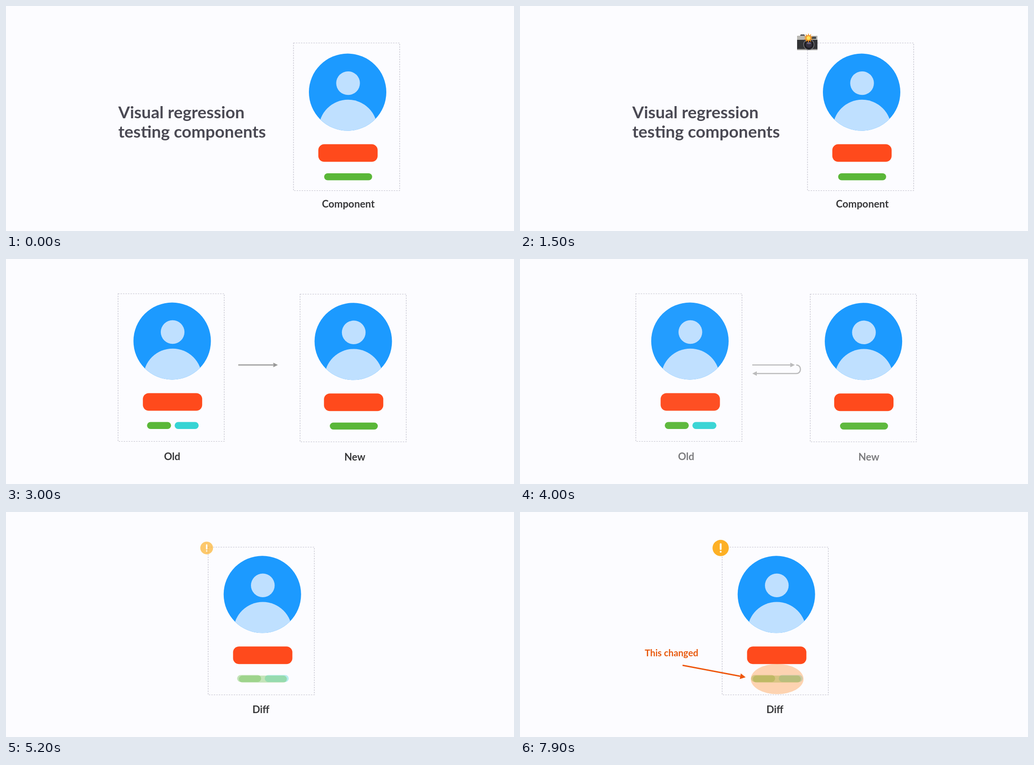
These frames come from a looping animation (1122x499 px, 8 s). An HTML page:

```html
<!DOCTYPE html>
<html lang="en">
<head>
<meta charset="utf-8">
<title>Visual regression testing</title>
<style>
  html, body { margin: 0; width: 100%; height: 100%; overflow: hidden; background: #fcfcff; }
  svg { display: block; width: 1122px; height: 499px; }
  text { font: 700 22.3px Lato, sans-serif; fill: #38383a; }
  .label { text-anchor: middle; }
  #title text { font-size: 37px; fill: #4b4a54; }
  .box { fill: none; stroke: #bdbcc8; stroke-width: 1.2; stroke-dasharray: 3 2.5; }
  .line { fill: none; stroke: #999; stroke-width: 2.6; }
  .head { fill: #999; }
  #note { font-size: 20.3px; fill: #e8590c; }
  #pointer .line { stroke: #ee560c; stroke-width: 3; }
  #pointer .head { fill: #ee560c; }
</style>
</head>
<body>
<svg viewBox="0 0 1122 499">
  <defs>
    <clipPath id="round"><circle r="85.5"/></clipPath>
    <g id="profile">
      <circle r="85.5" fill="#1c9aff"/>
      <g fill="#bfe0ff">
        <circle cx="1" cy="-20" r="26.2"/>
        <circle cx="1" cy="81.3" r="64.6" clip-path="url(#round)"/>
      </g>
      <rect x="-64.7" y="115.5" width="131" height="39" rx="13" fill="#ff4a1c"/>
    </g>
  </defs>

  <g id="title">
    <text x="248" y="249">Visual regression</text>
    <text x="248" y="291.5">testing components</text>
  </g>
  <text id="component" class="label" x="756" y="447">Component</text>

  <g id="oldCard">
    <g id="oldBody">
      <rect class="box" x="-119.5" y="-105" width="234.5" height="327.5"/>
      <use href="#profile"/>
    </g>
    <g id="oldBars">
      <rect x="-55.5" y="179.5" width="53" height="15.6" rx="7.8" fill="#5ab738"/>
      <rect x="5.5" y="179.5" width="53" height="15.6" rx="7.8" fill="#36d4d4"/>
    </g>
  </g>

  <rect id="newBox" class="box" width="234.5" height="327.5"/>
  <g id="newCard">
    <use href="#profile"/>
    <rect id="newBar" x="-51.8" y="179.9" width="106" height="15.6" rx="7.8" fill="#5ab738"/>
  </g>

  <g id="camera">
    <path d="M618 67l2-4h8l2 4z" fill="#55565a"/>
    <rect x="612" y="66" width="45" height="32" rx="2.5" fill="#323336"/>
    <path d="M612 75v-6.500q0-2.500 2.500-2.500h40q2.500 0 2.500 2.500v6.500z" fill="#b9b8b3"/>
    <rect x="644" y="68" width="10" height="5" rx="1" fill="#454b50"/>
    <rect x="612" y="95.500" width="45" height="2.500" rx="1" fill="#a5a4a0"/>
    <circle cx="638" cy="85.500" r="11.500" fill="#1d1d21" stroke="#77777b" stroke-width="1.500"/>
    <circle cx="638" cy="85.500" r="7" fill="#35313f"/>
    <ellipse cx="638" cy="82.500" rx="4.500" ry="2" fill="#6c6580"/>
    <path id="flash" fill="#f7941d"/>
    <circle cx="637" cy="71" r="4.200" fill="#ffe45c"/>
  </g>

  <g id="names">
    <text class="label" x="367" y="446">Old</text>
    <text class="label" x="770.5" y="446.500">New</text>
  </g>
  <g id="swap">
    <g id="forth"><path class="line" d="M513 235H597"/><path class="head" d="M0-5L10 0L0 5z"/></g>
    <g id="back"><path class="line" d="M610 235C622.500 235 622.500 254 610 254H523"/><path class="head" d="M0-5L10 0L0 5z"/></g>
  </g>

  <text id="diff" class="label" x="563" y="446">Diff</text>
  <g id="badge">
    <circle r="18" fill="#fdb025"/>
    <path d="M0-8.500V2.500M0 8.300v.1" stroke="#fff" stroke-width="4" stroke-linecap="round"/>
  </g>
  <ellipse id="mark" cx="568" cy="370.500" rx="58.300" ry="33.500" fill="#ff841c" fill-opacity=".34"/>
  <text id="note" x="275.500" y="320">This changed</text>
  <g id="pointer"><path class="line" d="M359 340L486.500 364.300"/><path class="head" d="M0-6.300L12 0L0 6.300z"/></g>
</svg>
<script>
const $ = id => document.getElementById(id);
const ramp = (t, a, b) => Math.min(1, Math.max(0, (t - a) / (b - a)));
const ease = u => u < .5 ? 2 * u * u : 1 - 2 * (1 - u) ** 2;
const mix = (a, b, u) => a + (b - a) * u;
const fade = (id, alpha) => $(id).style.opacity = alpha;
const place = (id, x, y, extra = '') => $(id).setAttribute('transform', `translate(${x} ${y}) ${extra}`);

// The arrowhead rides on the end of the line as it grows.
function grow(id, u) {
  const [line, head] = $(id).children;
  const length = line.getTotalLength(), at = u * length;
  const p = line.getPointAtLength(at), q = line.getPointAtLength(Math.max(at - 1, 0));
  const angle = Math.atan2(p.y - q.y, p.x - q.x) * 180 / Math.PI;
  line.style.strokeDasharray = `${at} ${length + 1}`;
  head.setAttribute('transform', `translate(${p.x} ${p.y}) rotate(${angle})`);
  $(id).style.display = u > 0 ? '' : 'none';
}

function render(t) {
  const intro = 1 - ramp(t, 1500, 1900);
  fade('title', intro);
  fade('component', intro);
  fade('camera', ramp(t, 500, 800) * intro);

  const shift = ease(ramp(t, 1500, 2100));
  const merge = ease(ramp(t, 3900, 4600));
  place('newBox', mix(635, 649.5, shift) - 203 * merge, mix(82, 78, shift));
  place('newCard', mix(754.5, 767, shift) - 200.8 * merge, mix(191.1, 182.8, shift));
  place('oldCard', 367 + 199 * merge, 182);

  const appear = ramp(t, 1850, 2235);
  const dim = mix(1, .35, ramp(t, 3977, 4500));
  fade('oldBody', appear * dim * (1 - ramp(t, 4500, 4700)));
  fade('oldBars', appear * dim);
  fade('newBar', dim);

  const leave = 1 - ramp(t, 3860, 4260);
  fade('names', appear * leave);
  fade('swap', leave);
  grow('forth', ease(ramp(t, 2600, 3100)));
  grow('back', ease(ramp(t, 3100, 3600)));

  fade('diff', ramp(t, 4240, 4640));
  const pop = ramp(t, 5000, 5300);
  place('badge', 443.2, 79.8, `scale(${ease(pop)})`);
  fade('badge', pop);
  fade('mark', ramp(t, 5450, 5800));
  fade('note', ramp(t, 5820, 6220));
  grow('pointer', ease(ramp(t, 6300, 6900)));
}

const spikes = Array.from({ length: 20 }, (_, i) => {
  const r = i % 2 ? 5.5 : 11, a = i * Math.PI / 10;
  return `${(637 + r * Math.sin(a)).toFixed(1)} ${(71 - r * Math.cos(a)).toFixed(1)}`;
});
$('flash').setAttribute('d', `M${spikes.join('L')}z`);

const start = performance.now();
function tick() {
  render((performance.now() - start) % 8000);
  requestAnimationFrame(tick);
}
tick();
</script>
</body>
</html>
```
